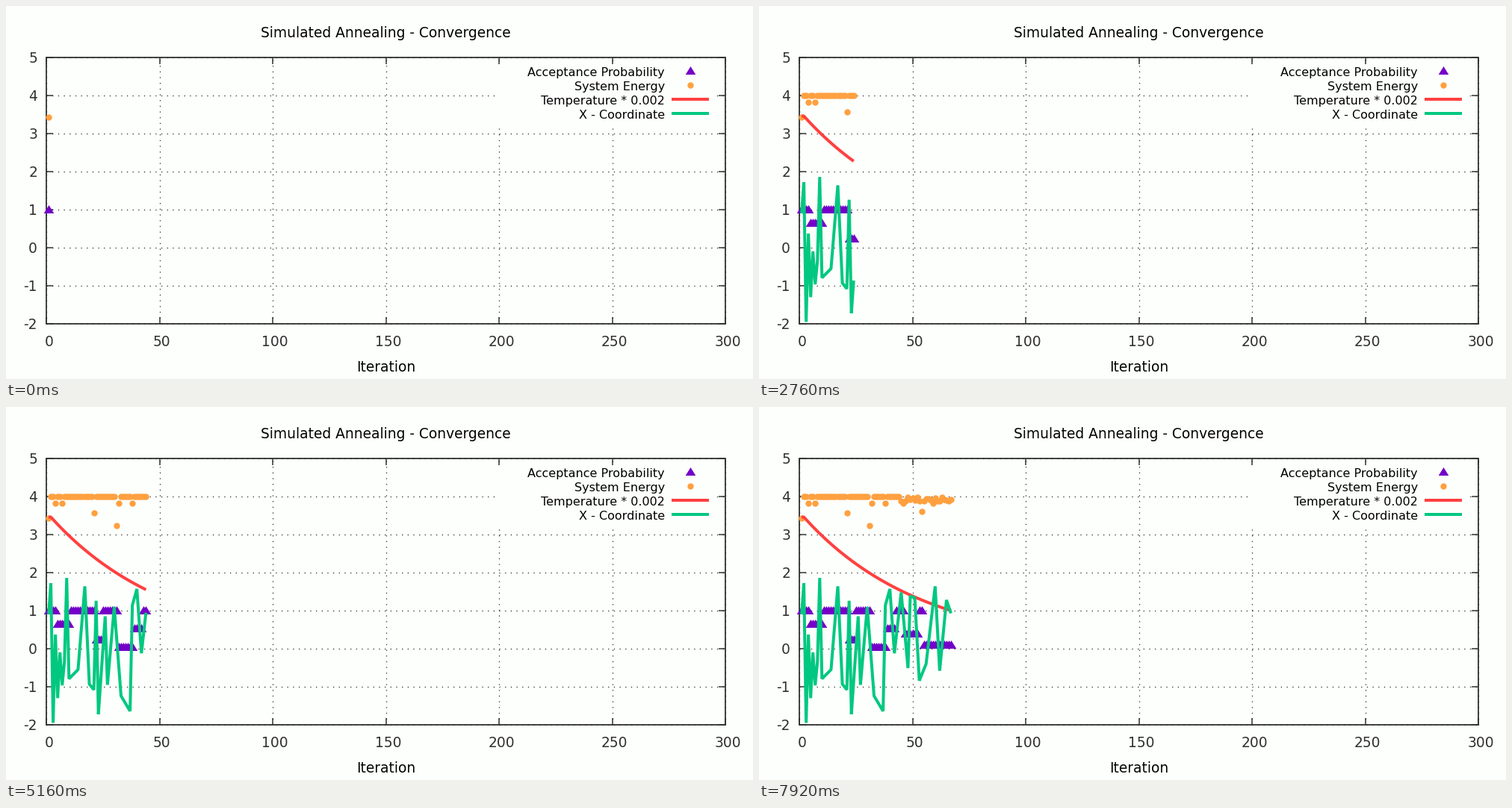
Recreate the animation shown at these times as a matplotlib script. Size 1000 by 500 pixels, loop 8000 ms.

```python
import matplotlib.pyplot as plt
import numpy as np
from matplotlib.animation import FuncAnimation
from matplotlib.patches import Rectangle
from matplotlib.path import Path

plt.rcParams.update({
    "font.family": "DejaVu Sans",
    "path.simplify": False,
    "toolbar": "None",
})

W, H, DPI = 1000, 500, 100
PX = 72 / DPI  # points per pixel
LEFT, RIGHT, TOP, BOTTOM = 54, 963, 69, 426

PAPER, INK, AXIS = "#fdfffc", "#000000", "#303030"
PURPLE, ORANGE, RED, GREEN = "#7400c8", "#ffa040", "#ff4040", "#00c880"

INTERVAL = 40
FRAMES = 200
FRAMES_PER_STEP = 3
COUNT = 67


def to_x(n):
    return LEFT + (RIGHT - LEFT) * np.asarray(n) / 300


def to_y(value):
    return BOTTOM - (BOTTOM - TOP) * (np.asarray(value) + 2) / 7


# Annealing run: one value per iteration
rng = np.random.default_rng(4)
iteration = np.arange(1, COUNT + 1)


def walk():
    """Coordinate: a damped bounce, then swings between turning points."""
    turns = [(1, 0.9), (2, 1.72), (9, 1.86), (10, -0.79), (14, -0.55),
             (17, 1.64), (19, -0.93), (21, -1.08), (22, 1.26), (23, -1.72),
             (26, 0.85), (27, -0.95), (30, 1.1), (33, -1.24), (37, -1.64),
             (38, 1.14), (40, 1.57), (42, -0.12), (45, 1.48), (48, -0.51),
             (49, 1.38), (51, 1.34), (53, -0.84), (56, -0.4), (60, 1.64),
             (62, -0.58), (65, 1.28), (67, 0.93)]
    swings = np.interp(iteration, *zip(*turns))
    bounce = -0.6 - 1.35 * (-0.72) ** (iteration - 3.0).astype(int).clip(0)
    return np.where((iteration > 2) & (iteration < 9), bounce, swings)


def plateau():
    """Energy: flat at 4 with a few dips, and noisy once it has cooled."""
    level = np.full(COUNT, 4.0)
    cooled = iteration > 44
    level[cooled] -= rng.uniform(0, 0.13, cooled.sum())
    for n in (4, 7, 32, 38, 46, 59):
        level[n - 1] = 3.82
    for n, depth in ((1, 0.57), (21, 0.43), (31, 0.77), (54, 0.39)):
        level[n - 1] = 4 - depth
    return level


def stairs():
    """Acceptance: holds each level until the next start."""
    steps = [(1, 1), (5, 0.65), (11, 1), (22, 0.23), (25, 1), (32, 0.04),
             (39, 0.52), (43, 1), (47, 0.4), (53, 1), (55, 0.1)]
    starts, levels = np.array(steps).T
    return levels[np.searchsorted(starts, iteration, side="right") - 1]


temperature = 3.46 * 0.9811 ** np.maximum(iteration - 2, 0)

fig = plt.figure(figsize=(W / DPI, H / DPI), dpi=DPI, facecolor=PAPER)
ax = fig.add_axes([0, 0, 1, 1])
ax.set(xlim=(0, W), ylim=(H, 0))
ax.axis("off")


def segment(x0, y0, x1, y1, width, color, z, **style):
    ax.plot([x0, x1], [y0, y1], color=color, lw=width * PX, zorder=z,
            solid_capstyle="butt", dash_capstyle="butt", **style)


def label(x, y, text, size, color=INK, ha="center"):
    ax.text(x, y, text, fontsize=size * PX, color=color, ha=ha,
            va="baseline", zorder=4)


def dotted(x0, y0, x1, y1):
    segment(x0, y0, x1, y1, 1.3, AXIS, 1, linestyle=(0, (1, 4.9)))


def tick(x, y, dx, dy):
    segment(x, y, x + dx, y + dy, 1.5, AXIS, 3)


BIG, SMALL, TICK = 18.67, 16, 9

for n in range(0, 301, 50):
    x = float(to_x(n))
    dotted(x, BOTTOM, x, TOP)
    tick(x, BOTTOM, 0, -TICK)
    tick(x, TOP, 0, TICK)
    label(x + 3.2, 456, str(n), BIG, AXIS)

for v in range(-2, 6):
    y = float(to_y(v))
    dotted(LEFT, y, RIGHT, y)
    tick(LEFT, y, TICK, 0)
    tick(RIGHT, y, -TICK, 0)
    label(42, y + 7, str(v), BIG, AXIS, "right")

ax.add_patch(Rectangle((LEFT, TOP), RIGHT - LEFT, BOTTOM - TOP, fill=False,
                       ec=AXIS, lw=1.8 * PX, zorder=3))
ax.add_patch(Rectangle((656, 79), 293, 80, fc=PAPER, ec="none", zorder=2))

label(508.7, 42, "Simulated Annealing - Convergence", BIG)
label(508.7, 490, "Iteration", BIG)

triangle = Path([(0, 6.5), (6.8, -4.5), (-6.8, -4.5), (0, 6.5)])
STYLES = [
    ("Acceptance Probability", stairs(),
     dict(ls="", marker=triangle, ms=13.6 * PX, mew=0, color=PURPLE)),
    ("System Energy", plateau(),
     dict(ls="", marker="o", ms=8.4 * PX, mew=0, color=ORANGE)),
    ("Temperature * 0.002", temperature, dict(lw=4 * PX, color=RED)),
    ("X - Coordinate", walk(), dict(lw=4 * PX, color=GREEN)),
]

xs = to_x(iteration)
curves = []
for row, (name, values, style) in enumerate(STYLES):
    style.update(solid_capstyle="butt", solid_joinstyle="bevel")
    y = 87 + 19 * row
    label(882, y + 7, name, SMALL, ha="right")
    sample = [916] if "marker" in style else [891, 941]
    ax.plot(sample, [y] * len(sample), zorder=4, **style)
    line, = ax.plot([], [], zorder=5 + row, **style)
    curves.append((line, to_y(values)))


def draw(frame):
    shown = min(frame // FRAMES_PER_STEP + 1, COUNT)
    for line, ys in curves:
        line.set_data(xs[:shown], ys[:shown])
    return [line for line, _ in curves]


anim = FuncAnimation(fig, draw, frames=FRAMES, interval=INTERVAL,
                     repeat=True, repeat_delay=0, blit=False)
plt.show()
```
